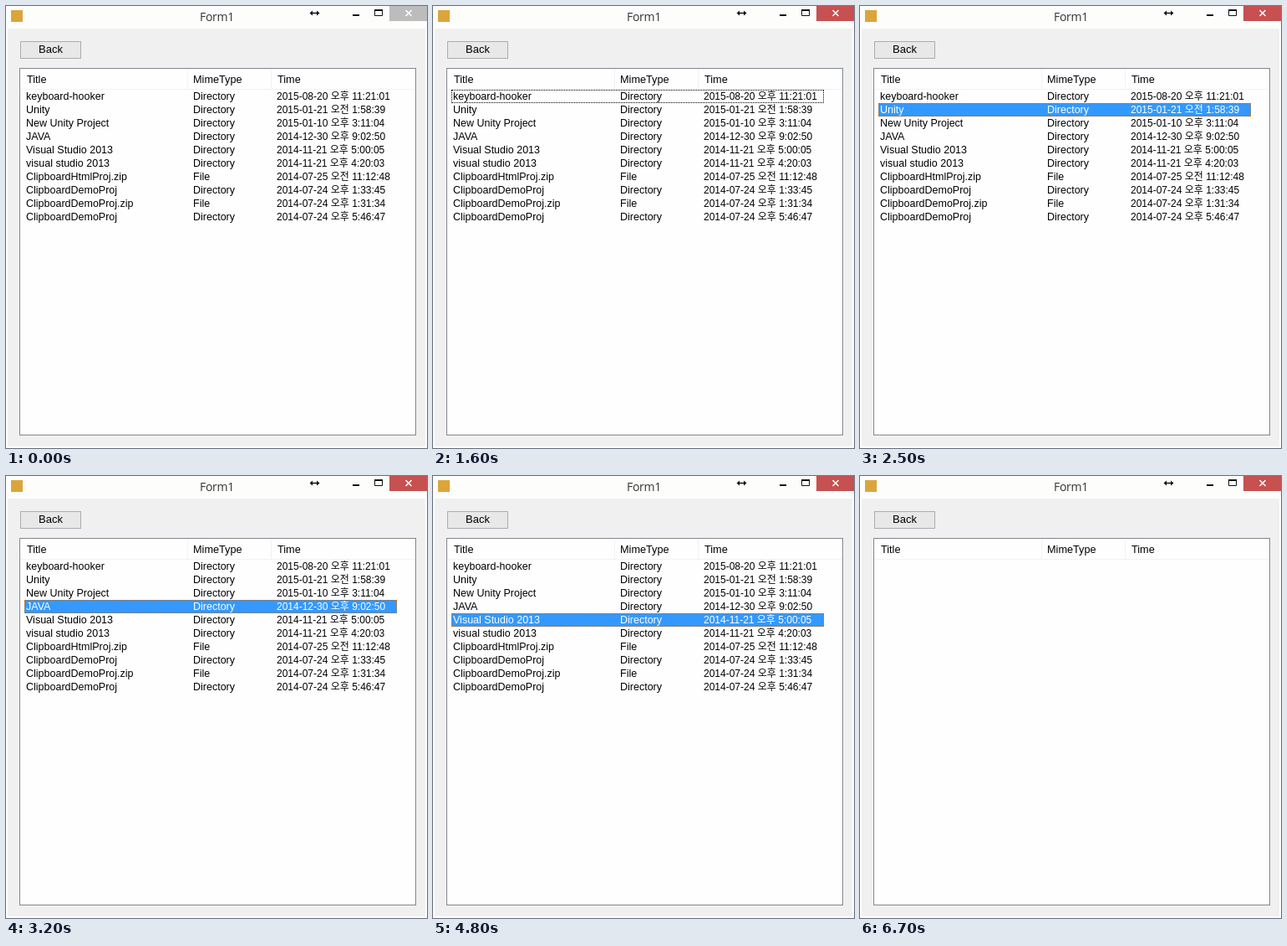
These frames come from a looping animation (504 px wide and 528 px high, 8000 ms). An HTML page:

```html
<!DOCTYPE html>
<html lang="ko">
<head>
<meta charset="utf-8">
<title>Form1</title>
<style>
  html, body { margin: 0; width: 100%; height: 100%; overflow: hidden; }
  body {
    --ink: #000; --mark: #39f; --dots: #c60;
    position: relative; background: #fdfdfc; color: var(--ink);
    font: 12.5px/16px "Liberation Sans", "Noto Sans CJK KR", "Noto Sans CJK", sans-serif;
  }
  div, span, svg { position: absolute; box-sizing: border-box; white-space: pre; }
  .title {
    left: 0; width: 505px; top: 3px; text-align: center; color: #333;
    font: 14px/20px "Open Sans", "Noto Sans", sans-serif; letter-spacing: -.3px;
  }
  .icon { left: 6px; top: 5px; width: 14px; height: 14px; background: #dba53a; }
  .client { left: 2px; top: 27px; width: 500px; height: 499px; background: #f0f0f0; }
  .back {
    left: 17px; top: 42px; width: 73px; height: 21px; line-height: 18px;
    border: 1px solid #acacac; background: #e8e8e8; text-align: center; font-size: 13px;
  }
  .list {
    left: 16px; top: 74px; width: 475px; height: 439px;
    border: 1px solid #828790; background: #fefefe;
  }
  .head span { top: 80px; font-size: 12.7px; }
  .rule { background: #f2f2f2; }
  .rows { animation: rows 8s step-end infinite; }
  .row { left: 22px; width: 446px; height: 16px; border: 1px dotted transparent; line-height: 14px; }
  .row span { top: 0; }
  .row span:nth-child(1) { left: 1px; }
  .row span:nth-child(2) { left: 201px; }
  .row span:nth-child(3) { left: 301px; font-size: 12px; }
  .row, .close { animation: 8s step-end infinite; }
  .row:nth-child(1) { animation-name: first; }
  .row:nth-child(2) { animation-name: second; }
  .row:nth-child(3) { animation-name: third; }
  .row:nth-child(4) { animation-name: fourth; }
  .row:nth-child(5) { animation-name: fifth; }
  .close { left: 459px; top: 0; width: 45px; height: 18px; animation-name: activate; }

  @keyframes activate {
    0% { background: #bcbcbc; }
    18.75%, 100% { background: #c75050; }
  }
  @keyframes rows {
    0% { visibility: visible; }
    83.75%, 100% { visibility: hidden; }
  }
  /* the selection steps down the list, then back up one row */
  @keyframes first {
    0%, 31.25%, 100% { border-color: transparent; background: transparent; color: var(--ink); }
    18.75% { border-color: #000; background: transparent; color: var(--ink); }
    30% { border-color: var(--dots); background: var(--mark); color: #fff; }
  }
  @keyframes second {
    0%, 38.75%, 100% { border-color: transparent; background: transparent; color: var(--ink); }
    31.25% { border-color: var(--dots); background: var(--mark); color: #fff; }
  }
  @keyframes third {
    0%, 40%, 100% { border-color: transparent; background: transparent; color: var(--ink); }
    38.75% { border-color: var(--dots); background: var(--mark); color: #fff; }
  }
  @keyframes fourth {
    0%, 60%, 83.75%, 100% { border-color: transparent; background: transparent; color: var(--ink); }
    40%, 75% { border-color: var(--dots); background: var(--mark); color: #fff; }
  }
  @keyframes fifth {
    0%, 75%, 100% { border-color: transparent; background: transparent; color: var(--ink); }
    60% { border-color: var(--dots); background: var(--mark); color: #fff; }
  }
</style>
</head>
<body>
  <div class="icon"></div>
  <div class="title">Form1</div>
  <div class="close"></div>
  <svg width="504" height="27" style="left:0;top:0" fill="none" stroke="#111">
    <path d="M365 8.5H374" stroke-width="1.5"/>
    <path d="M367 5.5V11.5L363.5 8.5ZM372 5.5V11.5L375.5 8.5Z" fill="#111" stroke="none"/>
    <path d="M415 11H423" stroke-width="2"/>
    <path d="M441.5 4V11.5H450.5V4"/>
    <path d="M441 5H451" stroke-width="2"/>
    <path d="M478.5 5L485.5 12M485.5 5L478.5 12" stroke="#fff" stroke-width="1.6"/>
  </svg>
  <div class="client"></div>
  <div class="back">Back</div>
  <div class="list"></div>
  <div class="rule" style="left:217px;top:75px;width:1px;height:24px"></div>
  <div class="rule" style="left:317px;top:75px;width:1px;height:24px"></div>
  <div class="rule" style="left:17px;top:99px;width:473px;height:1px"></div>
  <div class="head" style="left:0;top:0">
    <span style="left:25px">Title</span>
    <span style="left:224px">MimeType</span>
    <span style="left:325px">Time</span>
  </div>
  <div class="rows" style="left:0;top:0"></div>
<script>
  const files = [
    ["keyboard-hooker", "2015-08-20 오후 11:21:01"],
    ["Unity", "2015-01-21 오전 1:58:39"],
    ["New Unity Project", "2015-01-10 오후 3:11:04"],
    ["JAVA", "2014-12-30 오후 9:02:50"],
    ["Visual Studio 2013", "2014-11-21 오후 5:00:05"],
    ["visual studio 2013", "2014-11-21 오후 4:20:03"],
    ["ClipboardHtmlProj.zip", "2014-07-25 오전 11:12:48"],
    ["ClipboardDemoProj", "2014-07-24 오후 1:33:45"],
    ["ClipboardDemoProj.zip", "2014-07-24 오후 1:31:34"],
    ["ClipboardDemoProj", "2014-07-24 오후 5:46:47"]
  ];
  document.querySelector(".rows").innerHTML = files.map(([name, time], i) => {
    const type = name.endsWith(".zip") ? "File" : "Directory";
    return `<div class="row" style="top:${100 + 16 * i}px">` +
      `<span>${name}</span><span>${type}</span><span>${time}</span></div>`;
  }).join("");
</script>
</body>
</html>
```
